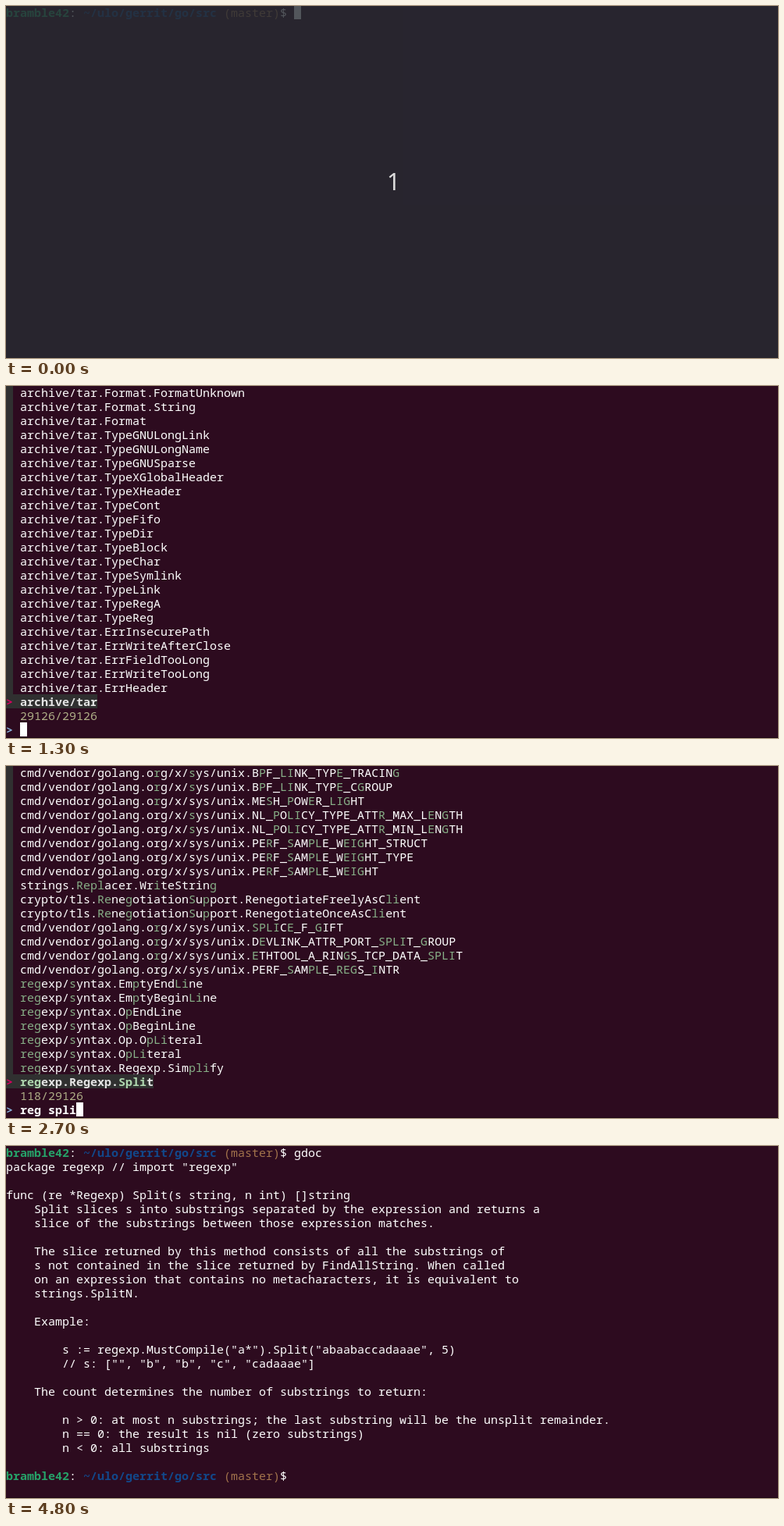
Write an HTML page that moves like this. It is 989 by 451 pixels and loops after 5000 ms.

```html
<!DOCTYPE html>
<html lang="en">
<head>
<meta charset="utf-8">
<title>Terminal doc search</title>
<style>
html, body { margin: 0; width: 100%; height: 100%; overflow: hidden; background: #2d0b1f; }
#stage { position: relative; width: 989px; height: 451px; overflow: hidden; background: #2d0b1f; }
#edge { position: absolute; left: 0; right: 0; bottom: 0; height: 1px; background: #1d0614; }
#term {
  position: absolute; left: 0; top: -1px; color: #fff;
  font: 15px/18px "Noto Sans Mono", "Liberation Mono", monospace;
  font-variant-ligatures: none; white-space: pre;
}
#term div { height: 18px; }
#term b { font-weight: 700; }
.host { color: #26a269; }
.path { color: #12488b; }
.branch { color: #a2734c; }
.cursor, .gutter, .sel { display: inline-block; height: 18px; vertical-align: top; }
.cursor { width: 9px; background: #fff; }
.gutter { width: 9px; background: #303030; }
.sel { background: #303030; color: #e4e4e4; font-weight: 700; }
.mark { color: #d7005f; }
.hit { color: #87af87; }
.sel .hit { color: #afd7af; }
.info { color: #afaf87; }
.ask { color: #87afd7; font-weight: 700; }
#count { position: absolute; inset: 0; background: rgba(39, 44, 51, .8); }
#count span {
  position: absolute; left: 488px; top: 210px; color: #dcdcdc;
  font: 30px/30px "Noto Sans", "Open Sans", sans-serif;
}
</style>
</head>
<body>
<div id="stage">
  <div id="term"></div>
  <div id="edge"></div>
  <div id="count"><span>1</span></div>
</div>
<script>
const LOOP = 5000, TOTAL = 29126;
const term = document.getElementById('term');
const count = document.getElementById('count');

const esc = s => s.replace(/&/g, '&amp;').replace(/</g, '&lt;');
const span = (cls, s = '') => `<span class="${cls}">${s}</span>`;
const rows = list => list.map(r => `<div>${r}</div>`).join('');
const lines = s => s.trim().split('\n');
const cursor = on => on ? span('cursor') : '';

const PROMPT = '<b class="host">bramble42</b>: <b class="path">~/ulo/gerrit/go/src</b> '
  + span('branch', '(master)') + '$ ';
const shell = (typed, on = true) => rows([PROMPT + typed + cursor(on)]);

// Short forms for long import paths; braces mark matched letters.
const PATHS = {
  '@': 'cmd/vendor/golang.org/x/sys/unix.',
  '~': 'cmd/vendor/golang.o{r}g/x/sys/unix.',
  '&': 'cmd/vendor/golang.org/x/{s}ys/unix.',
  '^': 'cmd/vendor/golang.o{r}g/x/{s}ys/unix.',
  '%': 'cmd/vendor/golang.org/x/arch/'
};
const item = s => s.replace(/[@~&^%]/g, c => PATHS[c])
  .replace(/\{(.*?)\}/g, (_, hit) => span('hit', hit));

// A finder screen: results, the chosen one, the tally and the query.
function finder(query, found, text) {
  const list = text ? lines(text).map(item) : [];
  const chosen = list.pop();
  const out = list.map(r => span('gutter') + ' ' + r);
  if (chosen) out.push(span('sel', span('mark', '>') + ' ' + chosen));
  while (out.length < 23) out.unshift('');
  out.push('  ' + span('info', `${found}/${text ? TOTAL : 0}`));
  out.push(span('ask', '>') + ` <b>${query}</b>` + cursor(true));
  return rows(out);
}

const prefixed = (head, names) => names.trim().split(/\s+/).map(n => head + n).join('\n');
const hitStart = (q, names) => names.trim().split(/\s+/)
  .map(n => `{${q}}${n.slice(q.length)}`).join('\n');

const ALL = prefixed('archive/tar.', `Format.FormatUnknown Format.String Format
  TypeGNULongLink TypeGNULongName TypeGNUSparse TypeXGlobalHeader TypeXHeader TypeCont
  TypeFifo TypeDir TypeBlock TypeChar TypeSymlink TypeLink TypeRegA TypeReg
  ErrInsecurePath ErrWriteAfterClose ErrFieldTooLong ErrWriteTooLong ErrHeader`)
  + '\narchive/tar';

const R = hitStart('r', `runtime.Error runtime.Frame reflect.Slice runtime.Stack
  reflect.Array reflect.Zero reflect.Type reflect.Kind reflect.Copy reflect.Chan
  reflect.Bool reflect.Uint reflect.Int8 reflect.Func runtime.GOOS runtime.Func
  reflect.New reflect.Map reflect.Int reflect.Ptr runtime.GC reflect regexp`);

const RE = hitStart('re', `reflect.Struct reflect.String reflect.Method reflect.Append
  reflect.Value reflect.Slice reflect.Int64 reflect.Int32 reflect.Array reflect.Zero
  reflect.Type reflect.Kind reflect.Copy reflect.Chan reflect.Bool reflect.Uint
  reflect.Int8 reflect.Func reflect.New reflect.Map reflect.Int reflect regexp`);

const REG = hitStart('reg', `regexp/syntax.OpCat regexp/syntax.Error regexp/syntax.Flags
  regexp/syntax.Parse regexp/syntax.OpAlt regexp.Regexp.Split regexp.Regexp.Match
  regexp.CompilePOSIX regexp/syntax.Perl regexp/syntax.Inst regexp/syntax.Prog
  regexp.Regexp.Find regexp.MustCompile regexp.MatchString regexp.MatchReader
  regexp/syntax.Op regexp.QuoteMeta regexp.Compile regexp/syntax regexp.Regexp
  regexp.Match regexp.Regexp regexp`);

const REG_SP = `
@NL80211_MAX_{S}U{P}P_{REG}_RULES
@Ptrace{Reg}s.{S}et{P}C
syscall.Ptrace{Reg}s.{S}et{P}C
{reg}exp/{s}yntax.{P}rog.StartCond
{reg}exp/{s}yntax.{P}rog.String
{reg}exp/{s}yntax.{P}rog.Prefix
{reg}exp/{s}yntax.{P}arse
{reg}exp/{s}yntax.{P}rog
%ppc64/ppc64asm.ArgType.TypeVec{SpReg}
%ppc64/ppc64asm.ArgType.Type{SpReg}
%ppc64/ppc64asm.{SpReg}.SpRegZero
%ppc64/ppc64asm.{SpReg}.String
%ppc64/ppc64asm.{SpReg}.IsArg
%ppc64/ppc64asm.{SpReg}
%arm64/arm64asm.{RegSP}.String
%arm64/arm64asm.{RegSP}
%arm64/arm64asm.{Reg}.{SP}
%x86/x86asm.{Reg}.{SP}B
%x86/x86asm.{Reg}.{SP}
%arm/armasm.{Reg}.{SP}
debug/elf.R_{SP}ARC.R_SPARC_{REG}ISTER
debug/elf.DynTag.DT_{SP}ARC_{REG}ISTER
{reg}exp.Regexp.{Sp}lit`;

const REG_SPL = `
^PERF_SAM{PL}E_W{E}I{G}HT_STRUCT
^PERF_SAM{PL}E_W{E}I{G}HT_TYPE
^PERF_SAM{PL}E_W{E}I{G}HT
crypto/tls.{Re}ne{g}otiation{S}u{p}port.RenegotiateFree{l}yAsClient
crypto/tls.{Re}ne{g}otiation{S}u{p}port.RenegotiateOnceAsC{l}ient
~D{E}VLINK_ATTR_PORT_{SPL}IT_{G}ROUP
~{E}THTOOL_A_RIN{G}S_TCP_DATA_{SPL}IT
~{SPL}IC{E}_F_{G}IFT
~{SPL}IC{E}_F_NONBLOCK
strings.{Repl}acer.WriteStrin{g}
{reg}exp/{s}yntax.O{p}.OpEndLine
{reg}exp/{s}yntax.O{p}.OpBeginLine
{reg}exp/{s}yntax.Em{p}tyBeginLine
{reg}exp/{s}yntax.Em{p}tyEnd{L}ine
{reg}exp/{s}yntax.O{p}.Op{L}iteral
{reg}exp/{s}yntax.O{pL}iteral
{reg}exp/{s}yntax.{P}er{l}X
{reg}exp/{s}yntax.{P}er{l}
@PERF_{S}AM{PL}E_{REG}S_INTR
@PERF_{S}AM{PL}E_{REG}S_USER
{reg}exp/{s}yntax.Sim{pl}eOp
{reg}exp/{s}yntax.Regexp.Sim{pl}ify
{reg}exp.Regexp.{Spl}it`;

const REG_SPLI = `
^B{P}F_{LI}NK_TYP{E}_TRACIN{G}
^B{P}F_{LI}NK_TYP{E}_C{G}ROUP
~ME{S}H_{P}OW{E}R_{LIG}HT
&NL_{P}O{LI}CY_TYPE_ATT{R}_MAX_L{E}N{G}TH
&NL_{P}O{LI}CY_TYPE_ATT{R}_MIN_L{E}N{G}TH
@PE{R}F_{S}AM{PL}E_W{EIG}HT_STRUCT
@PE{R}F_{S}AM{PL}E_W{EIG}HT_TYPE
@PE{R}F_{S}AM{PL}E_W{EIG}HT
strings.{Repl}acer.Wr{i}teStrin{g}
crypto/tls.{Re}ne{g}otiation{S}u{p}port.RenegotiateFreelyAsC{li}ent
crypto/tls.{Re}ne{g}otiation{S}u{p}port.RenegotiateOnceAsC{li}ent
~{SPLI}C{E}_F_{G}IFT
~D{E}VLINK_ATTR_PORT_{SPLI}T_{G}ROUP
~{E}THTOOL_A_RIN{G}S_TCP_DATA_{SPLI}T
@PERF_{S}AM{PL}E_{REG}S_{I}NTR
{reg}exp/{s}yntax.Em{p}tyEnd{Li}ne
{reg}exp/{s}yntax.Em{p}tyBegin{Li}ne
{reg}exp/{s}yntax.O{p}EndLine
{reg}exp/{s}yntax.O{p}BeginLine
{reg}exp/{s}yntax.Op.O{pLi}teral
{reg}exp/{s}yntax.O{pLi}teral
{reg}exp/{s}yntax.Regexp.Sim{pli}fy
{reg}exp.Regexp.{Spli}t`;

const REG_SPLIT = `
&DEVLINK_CMD_T{R}AP_{P}O{LI}C{E}R_{G}E{T}
crypto/x509.ErrUn{s}u{p}po{r}t{e}dA{lg}or{it}hm
^B{P}F_{LI}NK_{T}YP{E}_TRACIN{G}
vendor/golang.o{r}g/x/net/dns/dnsm{e}ssa{g}e.Parser.{S}ki{p}A{l}lAuthor{it}ies
comp{res}s/{g}zi{p}.Reader.Mu{l}t{i}s{t}ream
vendor/golang.o{r}g/x/net/dns/dnsm{e}ssa{g}e.Parser.{S}ki{p}A{l}lAdd{it}ionals
^B{P}F_{LI}NK_{T}YP{E}_C{G}ROUP
~NL80211_ME{S}H_{P}OW{E}R_{LIG}H{T}_SLEEP
&NL_{P}O{LI}CY_{T}YPE_ATT{R}_MAX_L{E}N{G}TH
&NL_{P}O{LI}CY_{T}YPE_ATT{R}_MIN_L{E}N{G}TH
vendor/golang.org/x/crypto/cryptobyte.{S}tring.{Re}adO{p}tiona{l}ASN1{I}n{t}e{g}er
@PE{R}F_{S}AM{PL}E_W{EIG}H{T}_STRUCT
@PE{R}F_{S}AM{PL}E_W{EIG}H{T}
@PE{R}F_{S}AM{PL}E_W{EIG}HT_{T}YPE
{s}trings.{Repl}acer.Wr{it}eStrin{g}
crypto/tls.{Re}ne{g}otiation{S}u{p}port.RenegotiateFreelyAsC{li}en{t}
crypto/tls.{Re}ne{g}otiation{S}u{p}port.RenegotiateOnceAsC{li}en{t}
~{SPLI}C{E}_F_{G}IF{T}
~D{E}VLINK_ATTR_PORT_{SPLIT}_{G}ROUP
~{E}THTOOL_A_RIN{G}S_TCP_DATA_{SPLIT}
@PERF_{S}AM{PL}E_{REG}S_{I}N{T}R
{reg}exp/{s}yntax.Op.O{pLit}eral
{reg}exp.Regexp.{Split}`;

const DOC = `
package regexp // import "regexp"

func (re *Regexp) Split(s string, n int) []string
    Split slices s into substrings separated by the expression and returns a
    slice of the substrings between those expression matches.

    The slice returned by this method consists of all the substrings of
    s not contained in the slice returned by FindAllString. When called
    on an expression that contains no metacharacters, it is equivalent to
    strings.SplitN.

    Example:

        s := regexp.MustCompile("a*").Split("abaabaccadaaae", 5)
        // s: ["", "b", "b", "c", "cadaaae"]

    The count determines the number of substrings to return:

        n > 0: at most n substrings; the last substring will be the unsplit remainder.
        n == 0: the result is nil (zero substrings)
        n < 0: all substrings`;
const doc = on => rows([PROMPT + 'gdoc', ...lines(DOC).map(esc), '', PROMPT + cursor(on)]);

const STEPS = [
  [0, shell('')],
  [400, shell('', false)],
  [500, shell('g', false)],
  [600, shell('g')],
  [800, shell('gd')],
  [900, shell('gdo')],
  [1100, shell('gdoc')],
  [1200, finder('', 0, '')],
  [1300, finder('', TOTAL, ALL)],
  [1800, finder('r', 24817, R)],
  [2000, finder('re', 17263, RE)],
  [2100, finder('reg', 3452, REG)],
  [2400, finder('reg sp', 1186, REG_SP)],
  [2500, finder('reg spl', 263, REG_SPL)],
  [2700, finder('reg spli', 118, REG_SPLI)],
  [2900, finder('reg split', 47, REG_SPLIT)],
  [3000, doc(true)],
  [3500, doc(false)],
  [4200, doc(true)],
  [4800, doc(false)]
];

const start = performance.now();
let shown = -1;

function draw() {
  const t = (performance.now() - start) % LOOP;
  const now = STEPS.filter(([at]) => at <= t).length - 1;
  if (now !== shown) term.innerHTML = STEPS[shown = now][1];
  count.hidden = t >= 100;
  count.style.display = t < 100 ? 'block' : 'none';
  requestAnimationFrame(draw);
}
draw();
</script>
</body>
</html>
```
